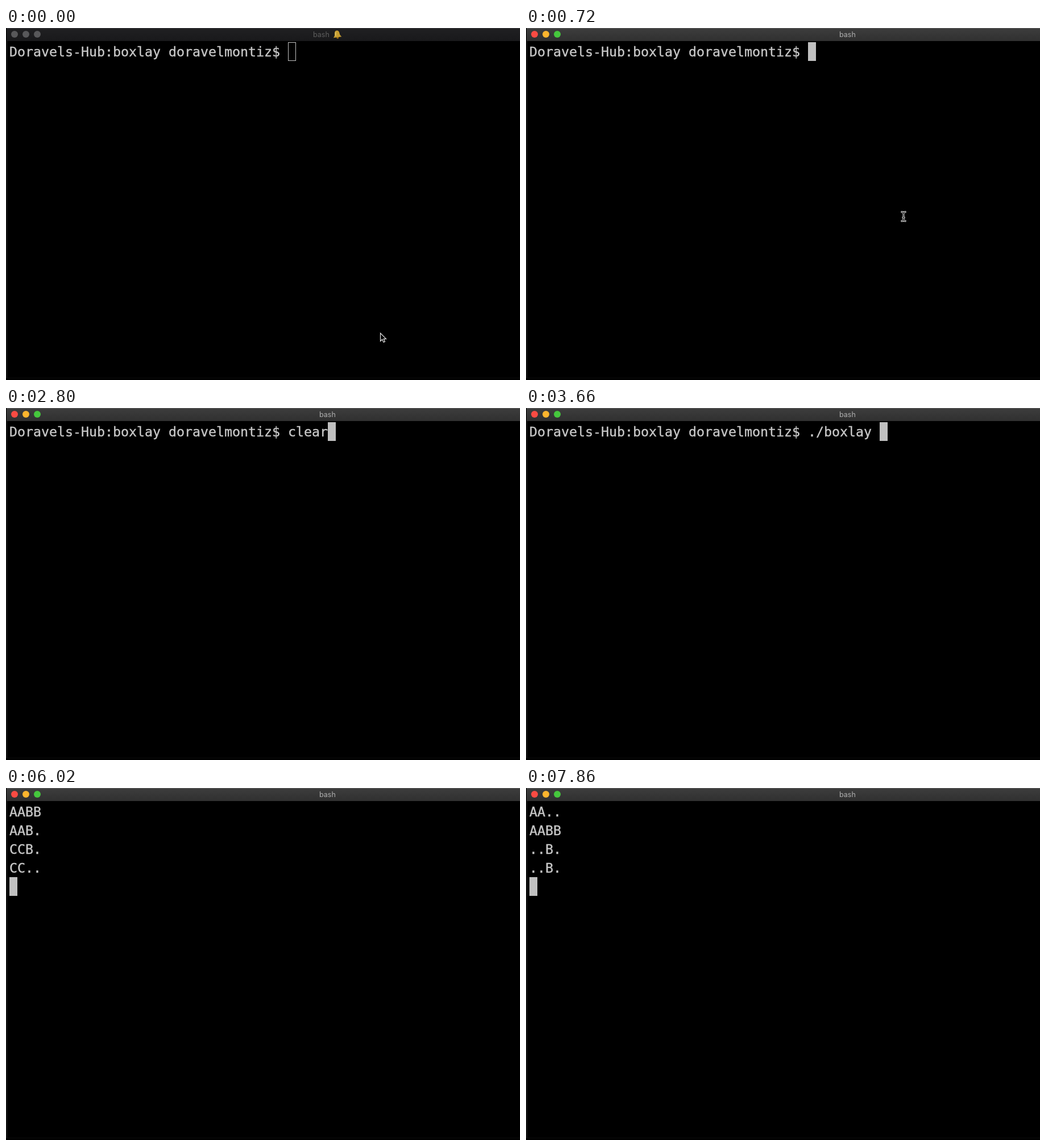
These frames come from a looping animation (904 px wide and 620 px high, 8 s). An HTML page:

```html
<!DOCTYPE html>
<html lang="en">
<head>
<meta charset="utf-8">
<title>Terminal</title>
<style>
html, body { margin: 0; width: 100%; height: 100%; overflow: hidden; background: #000; }
#stage { position: relative; width: 904px; height: 620px; overflow: hidden; background: #000; }
#stage > *, #bar > * { position: absolute; }
#edge { left: 1px; top: 0; width: 902px; height: 616px; border-left: 1px solid #292929; border-bottom: 1px solid #0c0c0c; }
#bar { left: 1px; top: 0; width: 903px; height: 23px; background: linear-gradient(#202022, #19191b); box-shadow: inset 0 1px #3c3c40; }
.light { top: 5px; width: 12px; height: 12px; border-radius: 50%; background: #58585a; }
#name { top: 3px; left: 539px; font: 12.5px/17px Inter, "Liberation Sans", sans-serif; color: #5e5e5e; }
#bell { left: 573px; top: 3px; opacity: .85; }
.on #bar { background: linear-gradient(#3d3d3d, #303030); box-shadow: inset 0 1px #5c5c5c; }
.on #name { left: 550px; color: #b0b0b0; }
.on #bell { display: none; }
.on .light { background: var(--c); }
#text { left: 6px; top: 25px; margin: 0; color: #c7c7c7; white-space: pre;
  font: 23.25px/33px "DejaVu Sans Mono", "Liberation Mono", monospace; -webkit-text-stroke: .4px; }
#caret { left: 0; top: 0; width: 14px; height: 33px; box-sizing: border-box; border: 1px solid #c0c0c0; }
.on #caret { background: #c0c0c0; }
#mouse { left: 0; top: 0; overflow: visible; }
</style>
</head>
<body>
<div id="stage">
  <div id="edge"></div>
  <div id="bar">
    <i class="light" style="left:8px;--c:#fa4b43"></i>
    <i class="light" style="left:28px;--c:#fdb52e"></i>
    <i class="light" style="left:48px;--c:#45c73d"></i>
    <span id="name">bash</span>
    <svg id="bell" width="17" height="17" viewBox="0 0 17 17">
      <g transform="rotate(-8 8.5 8.5)">
        <circle cx="8.5" cy="14" r="2" fill="#a8740c"/>
        <path d="M8.5 1.5C5 1.5 4.3 4.5 4 8C3.8 10.5 2.5 11.5 1.2 13.2H15.8C14.5 11.5 13.2 10.5 13 8C12.7 4.5 12 1.5 8.5 1.5Z" fill="#e6b534"/>
        <path d="M6.6 4Q5.8 7 5.6 10.5" stroke="#ffe580" stroke-width="1.3" fill="none"/>
      </g>
    </svg>
  </div>
  <pre id="text"></pre>
  <div id="caret"></div>
  <svg id="mouse" width="1" height="1">
    <path id="arrow" d="M.5 .5V14.5L3.7 11.5L6 16.5L8.4 15.4L6.2 10.6H10.5Z" fill="#000" stroke="#e4e4e4" stroke-width="1.2"/>
    <g id="beam" fill="none" stroke-linecap="square">
      <path d="M-3 -8Q0 -8 0 -5.5Q0 -8 3 -8M0 -6V6M-3 8Q0 8 0 5.5Q0 8 3 8M-1 2H1" stroke="#dedede" stroke-width="3"/>
      <path d="M-3 -8Q0 -8 0 -5.5Q0 -8 3 -8M0 -6V6M-3 8Q0 8 0 5.5Q0 8 3 8M-1 2H1" stroke="#000"/>
    </g>
  </svg>
</div>
<script>
const LOOP = 8000, CELL = 14, ROW = 33;
const FOCUS = 560, HIDE = 2520;
const MOVE = { start: 20, end: 540, from: [658, 537], to: [664, 332] };
const $ = id => document.getElementById(id);

const prompt = 'Doravels-Hub:boxlay doravelmontiz$ ';
const typed = (t, s) => [t, prompt + s];
const board = (t, rows) => [t, rows.replace(/ /g, '\n') + '\n'];

// Each step: start time and the whole screen content
const steps = [
  typed(0, ''),
  typed(2520, 'c'),
  typed(2580, 'cl'),
  typed(2640, 'cle'),
  typed(2700, 'clea'),
  typed(2760, 'clear'),
  typed(3000, ''),
  typed(3360, '.'),
  typed(3440, './'),
  typed(3540, './b'),
  typed(3660, './boxlay '),
  typed(3800, './boxlay t'),
  typed(3880, './boxlay te'),
  typed(4020, './boxlay test.txt '),
  board(5500, 'AA.. AA.. .... ....'),
  board(5740, 'AABB AAB. ..B. ....'),
  board(5980, 'AABB AAB. CCB. CC..'),
  board(6300, 'AABB AAB. ..B. ....'),
  board(6980, 'AA.. AA.. .... ....'),
  board(7320, 'AA.. AABB ..B. ..B.')
];

const ease = p => p * p * (3 - 2 * p);
const clamp = p => Math.min(1, Math.max(0, p));

function drawScreen(t) {
  const content = steps.findLast(s => s[0] <= t)[1];
  if ($('text').textContent !== content) $('text').textContent = content;
  const lines = content.split('\n');
  const col = lines[lines.length - 1].length;
  $('caret').style.transform =
    `translate(${6 + col * CELL}px, ${25 + (lines.length - 1) * ROW}px)`;
}

function drawMouse(t) {
  const p = ease(clamp((t - MOVE.start) / (MOVE.end - MOVE.start)));
  const [x, y] = MOVE.from.map((a, i) => a + (MOVE.to[i] - a) * p);
  const active = t >= FOCUS;
  $('mouse').style.transform = `translate(${x}px, ${y}px)`;
  $('mouse').style.display = t < HIDE ? '' : 'none';
  $('arrow').style.display = active ? 'none' : '';
  $('beam').style.display = active ? '' : 'none';
}

function render(now) {
  const t = now % LOOP;
  $('stage').classList.toggle('on', t >= FOCUS);
  drawScreen(t);
  drawMouse(t);
}

const origin = performance.now();
function tick() {
  render(performance.now() - origin);
  requestAnimationFrame(tick);
}
tick();
</script>
</body>
</html>
```
